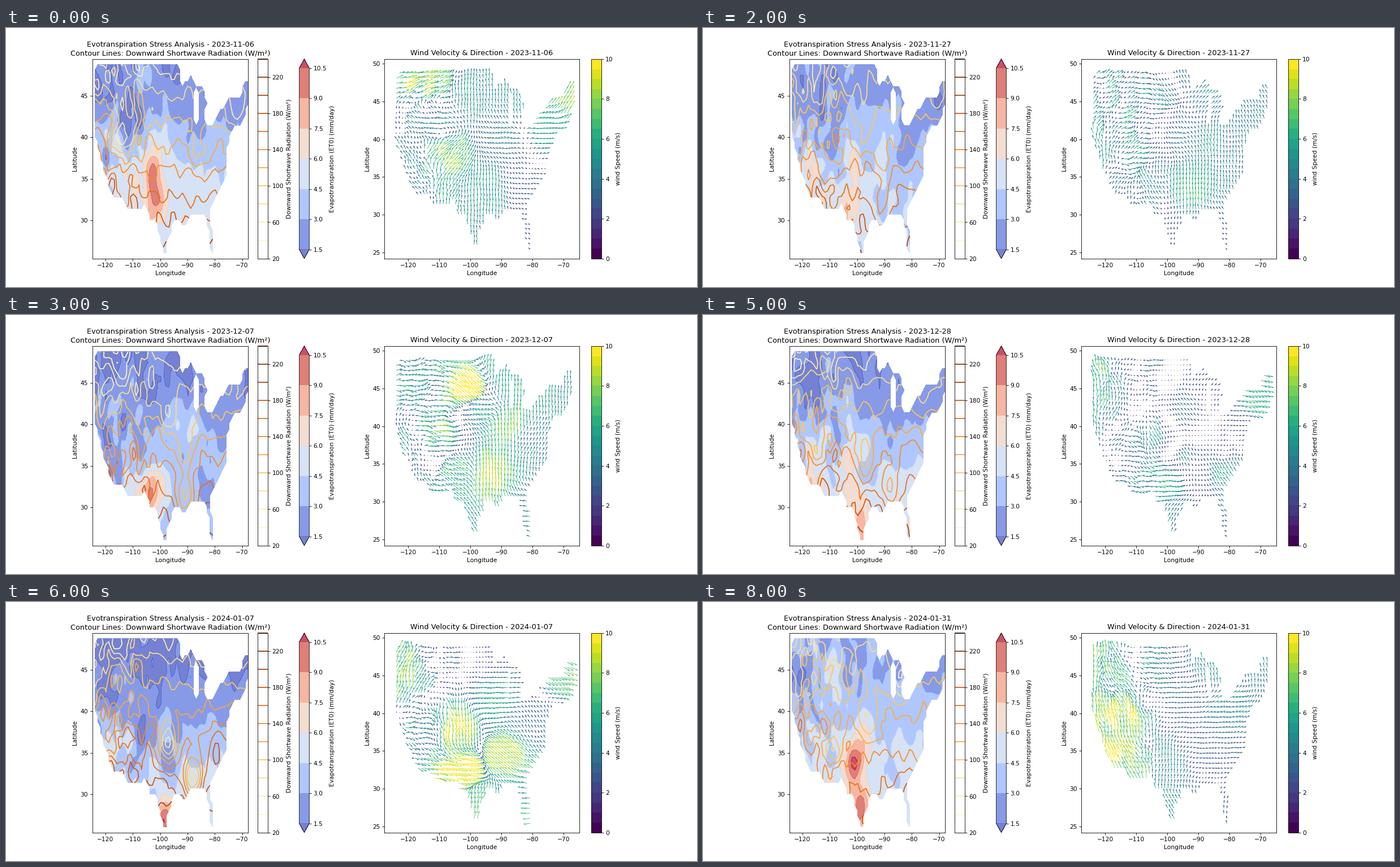
Animation, 1222 px wide and 458 px high, one loop 9000 ms. Source, as a matplotlib script:

```python
import numpy as np
import matplotlib.pyplot as plt
from matplotlib.animation import FuncAnimation
from matplotlib.path import Path

DPI = 76.375
DATES = ["2023-11-06", "2023-11-17", "2023-11-27", "2023-12-07", "2023-12-18",
         "2023-12-28", "2024-01-07", "2024-01-19", "2024-01-31"]
ET_LEVELS = np.arange(1.5, 10.6, 1.5)
RAD_LEVELS = np.arange(20, 241, 20)

X, Y = np.meshgrid(np.linspace(-124.8, -67.8, 58), np.linspace(25.4, 49.4, 37))
SOUTH = (48 - Y) / 18
WEST = 1 / (1 + np.exp((X + 104) / 2))  # rough mountain terrain

# Corners of the coast, clockwise from the south-east seen from below (lon, lat)
COAST = [
    (-93.1, 49), (-122.6, 49), (-124.4, 48.4), (-124.4, 40.5), (-122, 37.5),
    (-119.6, 34.6), (-117, 32.7), (-114.3, 32.6), (-111.4, 31.2), (-107.6, 31.2),
    (-105.5, 31.6), (-103.4, 29.2), (-102, 29.8), (-99.2, 26.5), (-99, 25.9),
    (-97.6, 25.9), (-97.4, 27.5), (-94.3, 29.8), (-90.6, 29.2), (-88, 30.6),
    (-83.1, 30), (-82.4, 27.4), (-80.9, 25.2), (-80.2, 25.2), (-81.2, 31.2),
    (-75.6, 35.5), (-75.4, 38.5), (-73.6, 40.8), (-70.2, 41.2), (-67.4, 44.2),
    (-67.4, 47.1), (-68.5, 47.5), (-70.9, 45.1), (-75.1, 45.1), (-76.2, 43.5),
    (-78.4, 43.4), (-82.2, 41.2), (-83.3, 42), (-82.7, 44.1), (-84.2, 46.6),
    (-87.2, 46.5), (-88.5, 47.5), (-91.8, 46.6)]
grid = np.column_stack([X.ravel(), Y.ravel()])
LAKE = ((X + 86.9) / 0.7) ** 2 + ((Y - 43.6) / 2.2) ** 2 < 1
LAND = Path(COAST).contains_points(grid).reshape(X.shape) & ~LAKE


def bump(lon, lat, amp):
    return amp * np.exp(-((X - lon) / 3.4) ** 2 - ((Y - lat) / 2.6) ** 2)


def flow(stations):
    """Blend a few (lon, lat, u, v) winds by inverse distance."""
    p = np.array(stations).T
    d = ((X[..., None] - p[0]) / 2.4) ** 2 + (Y[..., None] - p[1]) ** 2
    w = (d + 0.6) ** -2
    return [(w * c).sum(-1) / w.sum(-1) for c in p[2:]]


def day(et, et_bumps, rad, rad_bumps, winds):
    """et and rad run from a northern to a southern value, plus local bumps."""
    ease = np.clip(SOUTH, 0, 1)
    ease = ease * ease * (3 - 2 * ease)
    stress = et[0] + (et[1] - et[0]) * ease + sum(bump(*b) for b in et_bumps)
    light = rad[0] + (rad[1] - rad[0]) * SOUTH + sum(bump(*b) for b in rad_bumps)
    return np.array([stress, light, *flow(winds)])


def noise(rng, tall=0):
    """Smoothed unit noise; tall adds north-south streaks."""
    n = rng.normal(size=X.shape)
    for axis in [0, 1] + [0] * tall:
        n = 2 * n + np.roll(n, 1, axis) + np.roll(n, -1, axis)
    return n / n.std()


nov_early = day(
    (1.8, 5.5), [(-103, 36.5, 5.2), (-101.5, 32.5, 4), (-111, 35.5, 2.5),
                 (-106, 46, 1.8), (-112, 42, -1.6), (-98, 40, 1.3)],
    (60, 180), [(-113, 40.5, -60), (-122, 41, 30), (-86, 38, -30), (-72, 43.5, -50)],
    [(-115, 48, 7, 2.5), (-99, 46, -.5, 5), (-86, 45, -1, 5), (-112, 42, -4, .7),
     (-108, 38, 5.5, 5.5), (-119, 36, -3, 3), (-95, 33, 0, 5.5), (-88, 40, -4, 1.2),
     (-77, 41.5, 6, .6), (-69, 46, 4, 7), (-81, 33, -2.5, .8)])
nov_mid = day(
    (3.5, 5.6), [(-102, 37, 5.6), (-103, 43, 2), (-116, 35.5, 3.5), (-112, 32.5, 3),
                 (-122, 44, -2), (-109, 38, -2.5), (-82, 38, -3), (-71, 44, -2.5)],
    (90, 180), [(-122, 41, -65), (-109, 37, -70), (-82, 38, -18), (-71, 44, -50)],
    [(-122, 40, .6, 6.5), (-112, 45, 1, 4), (-115, 34, 5, 2), (-97, 48, -3.5, .3),
     (-86, 46, 6.5, -.3), (-97, 43, 1, 3), (-103, 36, 1, 4.5), (-94, 39, -3, .8),
     (-90, 34, -.3, 4.5), (-78, 37, -2, 4.5), (-71, 44, -4, 3), (-98, 28, 3, 0)])
dec_early = day(
    (1.5, 4), [(-104, 31.5, 5.5), (-100, 33, 2), (-88, 40, 2.2), (-95, 41, 2),
               (-84, 32, -1.2)],
    (55, 178), [(-115, 47, -30), (-97, 41, -45), (-91, 37, -45), (-91, 31, -75)],
    [(-101, 46, 8.5, -7), (-93, 48, 1, 6), (-88, 45, .5, 6), (-87.5, 40, -.5, 8),
     (-94, 33, -.5, 8.5), (-118, 45, 4.5, .4), (-111, 39, 6, -1), (-120, 37, -2, 3),
     (-103, 33, -5, 3), (-95, 42, -5, 2), (-80, 38, 1.5, 3.5), (-81, 28, -4, 1)])
dec_mid = day(
    (2, 6.3), [(-104, 42, 5), (-103, 36, 4), (-97, 38, 2.5), (-101, 31.5, 3),
               (-110, 47, 2.5), (-88, 38, -1.2), (-113, 34, 1.5)],
    (52, 175), [(-114, 37, -45), (-104, 45, 15), (-77, 43, -30)],
    [(-122, 40, -3, 7), (-121, 46, -3, 5), (-115, 42, -1, 4), (-95, 43, .3, 5.5),
     (-98, 36, -.7, 5), (-87, 45, 6.5, 3.5), (-76, 41, 6.5, -2), (-85, 37, 3.2, -.5),
     (-107, 38, 3, -.5), (-102, 47, 3, 0), (-90, 33, 5, -1.5), (-80, 33, -1.5, 5.5)])
jan_early = day(
    (1, 4.8), [(-98.5, 27, 5.5), (-90, 31, 1), (-97, 34, -2), (-106, 37, -1.8),
               (-116, 36, 1.2)],
    (65, 190), [(-97, 36, -95), (-88, 32, -105), (-110, 41, 20), (-79, 36, 30)],
    [(-122, 45, 2, 7), (-108, 48, 2, -1), (-96, 47, -2, .5), (-91, 42, -6, -.7),
     (-104, 38.5, .7, -9), (-103, 32.5, 10, -3), (-89, 34, -6.5, 6), (-97, 28, 1.5, 7),
     (-81, 28, -6, 0), (-79, 39, -2, 3), (-70, 45, 6, -3), (-115, 38, 3, -1.5)])
jan_late = day(
    (3, 5.2), [(-101, 34, 5.5), (-98, 37, 2), (-99, 28.5, 4.5), (-120, 42, -1.3),
               (-109, 45, 2.2), (-72, 44, -1.2), (-87, 32, -1)],
    (78, 165), [(-122, 44, -35), (-110, 35, -45), (-96, 39, -50), (-84, 44, -50),
                (-82, 30, 20)],
    [(-123.5, 46, 0, 6.5), (-116, 39, -2, 8.5), (-113, 33, -3.5, 7), (-115, 44, -4, 4),
     (-105, 46, 4, -1.5), (-96, 42, 3.2, 0), (-99, 33, .7, 4.5), (-98, 27, -2, 4),
     (-88, 35, 3, -.3), (-85, 45.5, -1.5, 5), (-81, 41, 4.5, 1.5), (-69, 46, -1, 4)])

DAYS = [nov_early, nov_mid, (nov_mid + dec_early) / 2, dec_early, dec_mid,
        (dec_mid + jan_early) / 2, jan_early, (jan_early + jan_late) / 2, jan_late]

fig, (ax1, ax2) = plt.subplots(1, 2, figsize=(16, 5.9968), dpi=DPI)
ax1.set(xlim=(-124.8, -67.8), ylim=(25.4, 49.4), xlabel="Longitude", ylabel="Latitude")
ax2.set(xlim=(-127.65, -64.95), ylim=(24.2, 50.6), xlabel="Longitude", ylabel="Latitude")
drawn = []


def draw(i):
    while drawn:
        drawn.pop().remove()
    rng = np.random.default_rng(40 + i)
    et, rad, u, v = DAYS[i]
    et = et + (0.3 + 0.5 * WEST) * noise(rng, tall=2)
    rad = rad + (4 + 9 * WEST) * noise(rng, tall=1)
    u, v = (c + (0.35 + 0.75 * WEST) * noise(rng) for c in (u, v))
    et, rad = (np.ma.masked_where(~LAND, f) for f in (et, rad))

    fill = ax1.contourf(X, Y, et, levels=ET_LEVELS, cmap="coolwarm",
                        alpha=0.7, extend="both")
    edge = ax1.contour(X, Y, et, levels=ET_LEVELS, cmap="coolwarm",
                       alpha=0.6, linewidths=0.5)
    lines = ax1.contour(X, Y, rad, levels=RAD_LEVELS, cmap="YlOrBr", linewidths=1.6)
    u, v = u[LAND], v[LAND]
    arrows = ax2.quiver(X[LAND], Y[LAND], u, v, np.hypot(u, v), scale=170,
                        width=0.0025, cmap=plt.get_cmap("viridis", 20), clim=(0, 10))
    drawn.extend([fill, edge, lines, arrows])
    ax1.set_title(f"Evotranspiration Stress Analysis - {DATES[i]}\n"
                  "Contour Lines: Downward Shortwave Radiation (W/m²)",
                  fontsize=12.1, pad=6.5)
    ax2.set_title(f"Wind Velocity & Direction - {DATES[i]}", fontsize=12.1, pad=6.5)
    return drawn


fill, _, lines, arrows = draw(0)
fig.colorbar(fill, ax=ax1, label="Evapotranspiration (ET0) (mm/day)")
fig.colorbar(lines, ax=ax1, label="Downward Shortwave Radiation (W/m²)")
fig.colorbar(arrows, ax=ax2, label="wind Speed (m/s)")

anim = FuncAnimation(fig, draw, frames=len(DATES), interval=1000, repeat=True,
                     repeat_delay=0)
plt.show()
```
